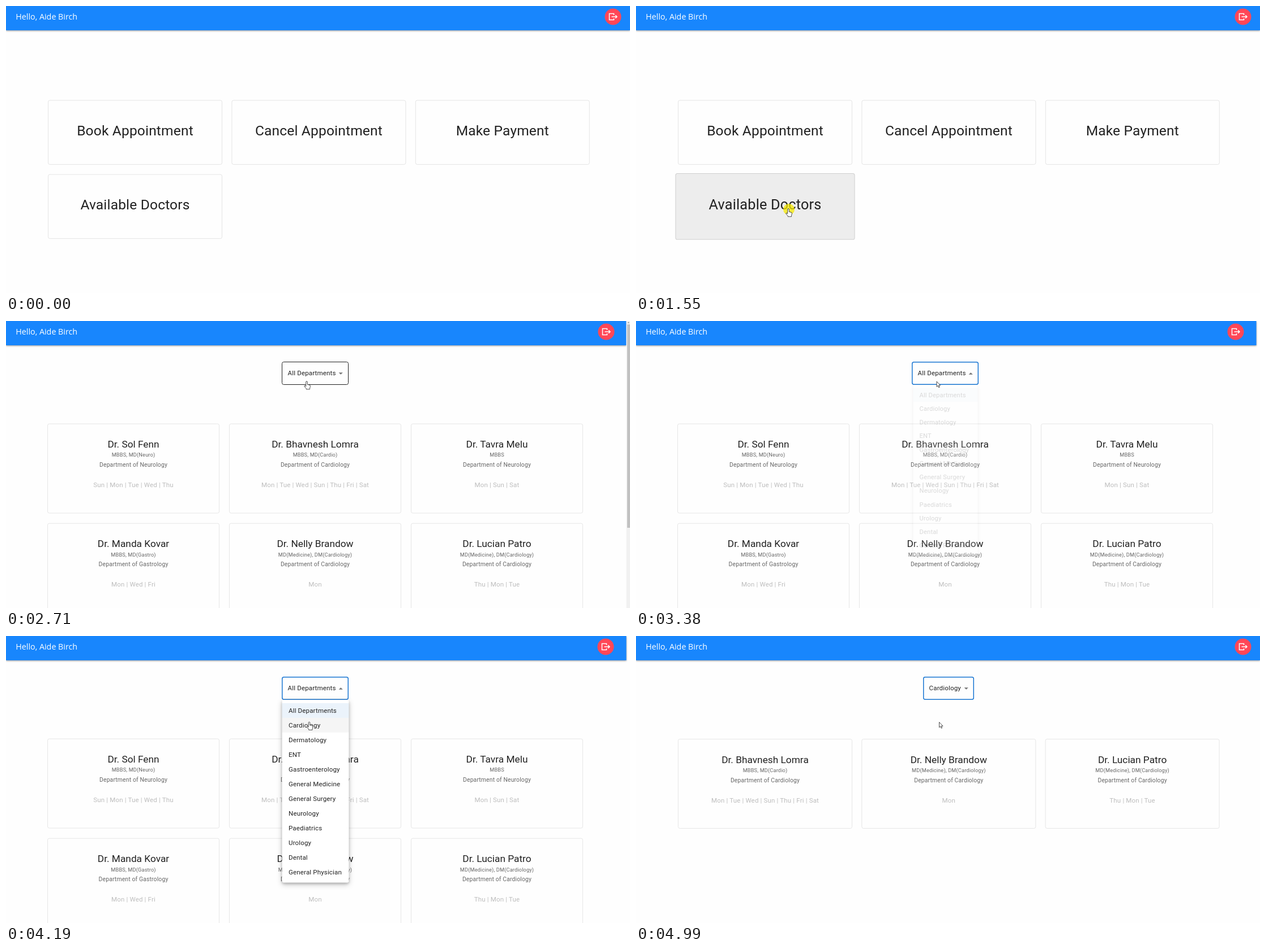
An HTML page for the animation above (6260 ms loop, 1102 px wide and 508 px high).

```html
<!DOCTYPE html>
<html lang="en">
<head>
<meta charset="utf-8">
<title>Clinic desk</title>
<style>
  html, body { margin: 0; width: 100%; height: 100%; overflow: hidden; background: #fefefe; }
  svg { display: block; font-family: Roboto, sans-serif; letter-spacing: .00938em; }
  .hello { font: 14.3px "Open Sans", sans-serif; letter-spacing: 0; fill: #fff; }
  .tile { font-size: 24.52px; letter-spacing: .00735em; fill: #212121; }
  .name { font-size: 17.3px; letter-spacing: 0; fill: #212121; }
  .degree { font-size: 9.23px; fill: #666; }
  .dept { font-size: 10.38px; fill: #666; }
  .days { font-size: 11.54px; fill: #bdbdbd; }
  .item { font-size: 11.54px; fill: #212121; }
  .bar { fill: #1886fd; filter: drop-shadow(0 1.4px 1.4px rgba(0,0,0,.42)); }
  .paper { fill: #fff; filter: drop-shadow(0 2px 2px rgba(0,0,0,.2)) drop-shadow(0 3px 5px rgba(0,0,0,.22)); }
</style>
</head>
<body>
<svg id="stage" width="1102" height="508" viewBox="0 0 1102 508"></svg>
<script>
const LOOP = 6260;
const stage = document.getElementById('stage');

const tiles = ['Book Appointment', 'Cancel Appointment', 'Make Payment', 'Available Doctors'];
const doctors = [
  ['Sol Fenn', 'MBBS, MD(Neuro)', 'Neurology', 'Sun Mon Tue Wed Thu'],
  ['Bhavnesh Lomra', 'MBBS, MD(Cardio)', 'Cardiology', 'Mon Tue Wed Sun Thu Fri Sat'],
  ['Tavra Melu', 'MBBS', 'Neurology', 'Mon Sun Sat'],
  ['Manda Kovar', 'MBBS, MD(Gastro)', 'Gastrology', 'Mon Wed Fri'],
  ['Nelly Brandow', 'MD(Medicine), DM(Cardiology)', 'Cardiology', 'Mon'],
  ['Lucian Patro', 'MD(Medicine), DM(Cardiology)', 'Cardiology', 'Thu Mon Tue']
];
const departments = ['All Departments', 'Cardiology', 'Dermatology', 'ENT', 'Gastroenterology',
  'General Medicine', 'General Surgery', 'Neurology', 'Paediatrics', 'Urology', 'Dental', 'General Physician'];

// pointer stops: time, x, y
const stops = [
  [70, 1022, 496], [260, 510, 398], [460, 510, 398], [820, 269, 359], [2210, 269, 359],
  [2710, 531, 107], [3480, 531, 107], [3780, 546, 127], [3920, 546, 127], [4190, 535.5, 152.5]
];

// app timeline, ms
const OPEN_PAGE = 1820, OPEN_MENU = 3310, PICK = 4640, FILTER = 4920;
const clicks = [[1550, 1680], [3240, 3310], [4450, 4520]];

const within = (t, a, b) => t >= a && t < b;
const mix = (a, b, k) => a + (b - a) * k;
const ease = (t, from, to) => {
  const u = Math.min(1, Math.max(0, (t - from) / (to - from)));
  return u * u * (3 - 2 * u);
};

// baselines sit on whole pixels
const text = (cls, x, y, str, anchor = 'middle') =>
  `<text class="${cls}" x="${x}" y="${Math.round(y)}" text-anchor="${anchor}">${str}</text>`;
const rect = (x, y, w, h, attrs) =>
  `<rect x="${x}" y="${y}" width="${w}" height="${h}" ${attrs}/>`;

function pointerAt(t) {
  let i = stops.length - 1;
  while (i > 0 && stops[i][0] > t) i--;
  const a = stops[i], b = stops[i + 1] || a;
  const k = a === b ? 0 : ease(t, a[0], b[0]);
  return [mix(a[1], b[1], k), mix(a[2], b[2], k)];
}

function header(width, iconX) {
  return rect(0, 0, width, 43, 'class="bar"') +
    text('hello', 17.3, 24, 'Hello, Aide Birch', 'start') +
    `<g transform="translate(${iconX} 19)"><circle r="14.5" fill="#ff4757"/>
     <path d="M1.5-3V-5.5H-6.5V5.5H1.5V3M-2.5 0H7M4.2-2.8 7 0 4.2 2.8" fill="none" stroke="#fff" stroke-width="1.5"/></g>`;
}

function home(t) {
  const hover = ease(t, 630, 820);
  return tiles.map((label, i) => {
    const k = i === 3 ? hover : 0, s = 1 + .03 * k;
    const cx = 228 + i % 3 * 324.4, cy = 223.7 + (i > 2 ? 131.2 : 0);
    return `<g transform="translate(${cx} ${cy}) scale(${s})">` +
      rect(-153.5, -56.7, 307, 113.4, `rx="3" fill="#000" fill-opacity="${.066 * k}" stroke="#000" stroke-opacity="${.1 + .06 * k}"`) +
      text('tile', 0, 5, label) + '</g>';
  }).join('');
}

function doctorCards(list, narrow) {
  const [left, width, pitch, top] = narrow ? [73.5, 303, 321, 182] : [74.5, 307, 324.3, 182.5];
  return list.map(([name, degree, dept, days], i) => {
    const x = left + i % 3 * pitch, y = top + Math.floor(i / 3) * 176.2, cx = x + width / 2;
    return rect(x, y, width, 158, 'rx="3" fill="none" stroke="#e6e6e6"') +
      text('name', cx, y + 42.2, 'Dr. ' + name) +
      text('degree', cx, y + 58.3, degree) +
      text('dept', cx, y + 76.2, 'Department of ' + dept) +
      text('days', cx, y + 112, days.split(' ').join(' | '));
  }).join('');
}

function select(label, cx, focused, hovered, open) {
  const w = label === 'Cardiology' ? 89 : 117, x = cx - w / 2;
  const inset = focused ? .25 : 0;
  const border = focused ? 'stroke="#1976d2" stroke-width="1.5"' : `stroke="${hovered ? '#212121' : '#c4c4c4'}"`;
  return rect(x + inset, 72.5 + inset, w - 2 * inset, 40 - 2 * inset, `rx="3" fill="none" ${border}`) +
    text('item', x + 10.1, 96.4, label, 'start') +
    `<path transform="translate(${x + w - 13.3} 93) scale(1 ${open ? -1 : 1})" d="M-3.6-1.8H3.6L0 1.8Z" fill="#757575"/>`;
}

function menu(t, py) {
  const closing = ease(t, 4660, 4880);
  const alpha = t < PICK ? ease(t, OPEN_MENU, 3590) : 1 - closing;
  if (alpha <= 0) return '';
  const grow = t < PICK ? mix(.92, 1, ease(t, OPEN_MENU - 50, 3480)) : 1 - .12 * ease(t, 4730, 4880);
  const chosen = t < PICK ? 0 : 1;
  const hot = t < 3700 ? -1 : py < 144.8 ? 0 : 1;
  const rows = departments.map((label, i) => {
    const y = 118.8 + i * 25.99;
    const tint = i === chosen ? (i === 1 ? .12 : .085) : 0;
    const fill = tint ? `fill="#1976d2" fill-opacity="${tint}"` : `fill-opacity="${i === hot ? .04 : 0}"`;
    return rect(487.5, y, 118, 26, fill) + text('item', 499, y + 17.3, label, 'start');
  }).join('');
  const r = 72 * ease(t, 4450, 5000);
  const ripple = t < 4450 ? '' :
    `<clipPath id="row">${rect(487.5, 144.8, 118, 26, '')}</clipPath>
     <circle cx="535" cy="153" r="${r}" fill="#142030" fill-opacity="${.2 * (1 - closing)}" clip-path="url(#row)"/>`;
  return `<g opacity="${alpha}" transform="translate(546.5 115) scale(${grow} ${grow * grow}) translate(-546.5 -115)">` +
    rect(487.5, 113, 118, 323.5, 'rx="3" class="paper"') + rows + ripple + '</g>';
}

function scrollbar() {
  return rect(1095.5, 0, 6.5, 508, 'fill="#f1f1f1"') + rect(1097, 6, 5, 360, 'fill="#c1c1c1"') +
    '<path d="M1097.5 3.5 1099.3 1.5 1101 3.5Z" fill="#808080"/>';
}

function pointer(t, [x, y]) {
  if (t < 70) return '';
  const hand = within(t, 640, 1950) || within(t, 2590, OPEN_MENU) || within(t, 3650, 4960);
  const shape = hand
    ? 'M-1.3 1a1.3 1.3 0 0 1 2.6 0V5.3L5 6.2Q6.6 6.6 6.4 8.5L5.5 12.3V13.8H-.8V12.5L-3.9 9Q-4.5 7.4-3 7.3L-1.3 8.8Z'
    : 'M0 0V9.4L2.2 7.4 3.7 10.8 5.2 10.1 3.7 6.9H6.5Z';
  const glow = clicks.some(([a, b]) => within(t, a, b))
    ? '<circle cx="1" cy="1" r="10" fill="#f5ea00" fill-opacity=".75"/>' : '';
  return `<g transform="translate(${x} ${y})">${glow}<path d="${shape}" fill="#fff" stroke="#222" stroke-width=".8" stroke-linejoin="round"/></g>`;
}

function scene(t) {
  const pos = pointerAt(t);
  if (t < OPEN_PAGE) return header(1102, 1072) + home(t) + pointer(t, pos);

  const narrow = t < FILTER;
  const locked = within(t, OPEN_MENU, PICK);
  const list = narrow ? doctors : doctors.filter(d => d[2] === 'Cardiology');
  return header(narrow ? 1095.5 : 1102, locked ? 1059 : narrow ? 1060 : 1072) +
    select(t < PICK ? 'All Departments' : 'Cardiology', narrow ? 546 : 552, t >= 3240, t >= 2590, locked) +
    doctorCards(list, narrow) +
    (narrow && !locked ? scrollbar() : '') +
    (t >= OPEN_MENU ? menu(t, pos[1]) : '') +
    pointer(t, pos);
}

const start = performance.now();
function tick() {
  stage.innerHTML = scene((performance.now() - start) % LOOP);
  requestAnimationFrame(tick);
}
tick();
</script>
</body>
</html>
```
